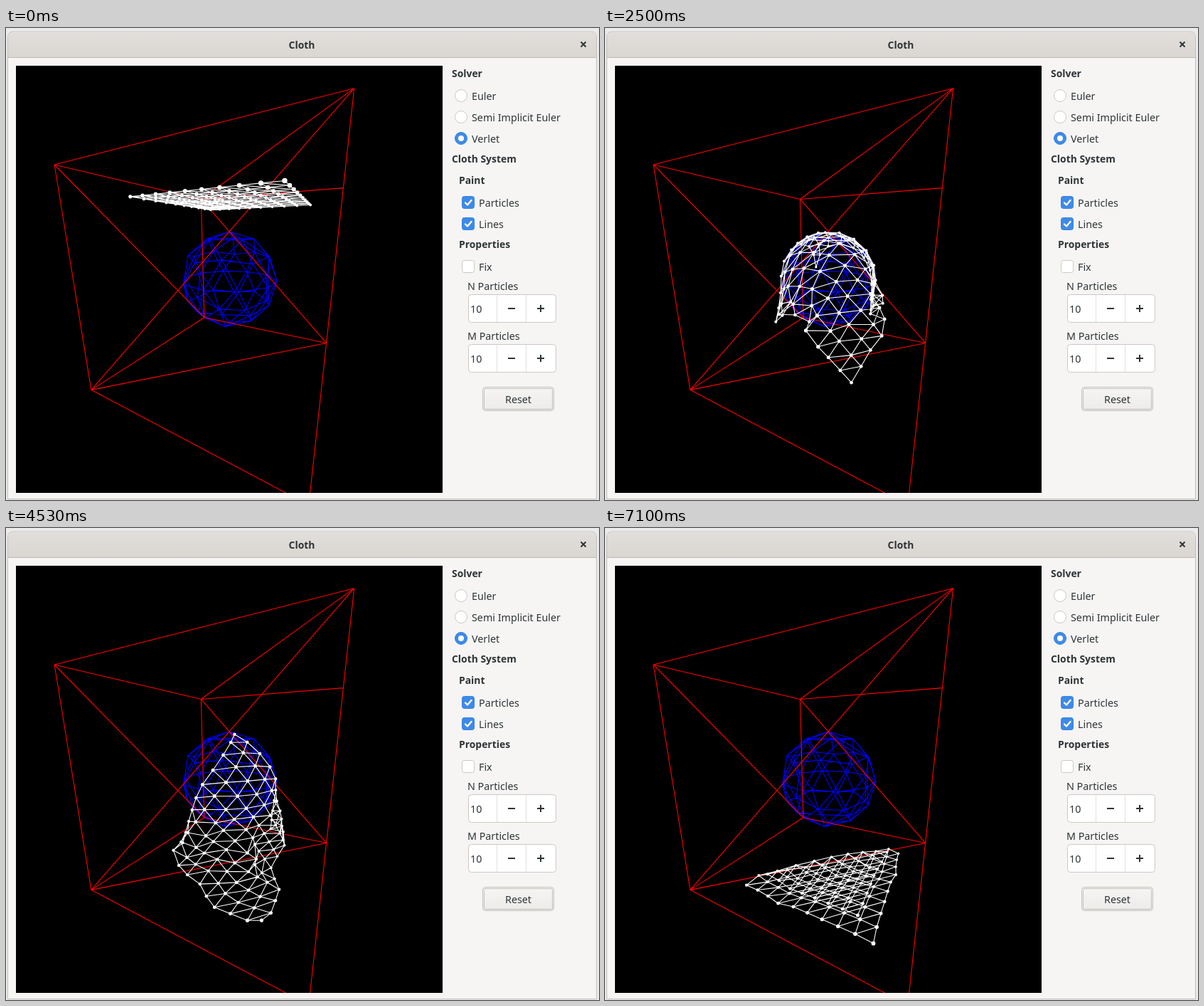
Animation of 834 by 663 pixels, one loop 7.13 s. Source, as an HTML page with a canvas:

```html
<!DOCTYPE html>
<html lang="en">
<head>
<meta charset="utf-8">
<title>Cloth</title>
<style>
html, body { margin: 0; width: 100%; height: 100%; overflow: hidden; background: #ebebeb; }
svg, canvas { position: absolute; left: 0; top: 0; }
canvas { left: 14px; top: 53px; }
text { font: 14.3px "Noto Sans", "Open Sans", sans-serif; fill: #2e3436; }
.b { font-weight: bold; font-size: 13.9px; }
.mid { text-anchor: middle; }
.box { fill: #fff; stroke: #cdc7c2; }
.on { fill: #3f8ae6; stroke: #3584e4; }
.mark { fill: none; stroke: #fff; stroke-width: 2.4; stroke-linecap: round; stroke-linejoin: round; }
.sign { fill: none; stroke: #2e3436; stroke-width: 2; }
</style>
</head>
<body>
<svg width="834" height="663" viewBox="0 0 834 663">
  <defs>
    <linearGradient id="bar" x2="0" y2="1"><stop stop-color="#e1dedb"/><stop offset="1" stop-color="#dad6d2"/></linearGradient>
    <linearGradient id="btn" x2="0" y2="1"><stop stop-color="#f6f5f4"/><stop offset="1" stop-color="#edebe9"/></linearGradient>
    <g id="check"><rect class="on" x=".5" y=".5" width="17" height="17" rx="3"/><path class="mark" d="M5 9.500l3 3 5.500-6.500"/></g>
    <g id="spin">
      <rect class="box" x=".5" y=".5" width="123" height="39" rx="4"/>
      <path d="M40.500 1v38M81.500 1v38" stroke="#e4e0dc"/>
      <path class="sign" d="M56 20h10M97 20h10M102 15v10"/>
      <text x="3" y="26">10</text>
    </g>
  </defs>
  <path d="M2.500 661.500V13q0-8 8-8h812q8 0 8 8v648.500z" fill="#f6f5f4" stroke="#c3beb9"/>
  <path d="M3 41V13q0-7.500 7.500-7.500h812q7.500 0 7.500 7.500v28z" fill="url(#bar)"/>
  <path d="M3 41.500h827" stroke="#bfb8b1"/>
  <path d="M808.500 19.500l7 7m0-7l-7 7" class="sign"/>
  <text class="b mid" x="416" y="29">Cloth</text>

  <text class="b" x="627" y="69">Solver</text>
  <circle class="box" cx="640" cy="95" r="8.500"/><text x="655" y="101">Euler</text>
  <circle class="box" cx="640" cy="125" r="8.500"/><text x="655" y="131">Semi Implicit Euler</text>
  <circle class="on" cx="640" cy="155" r="8.500"/><circle cx="640" cy="155" r="4" fill="#fff"/>
  <text x="655" y="161">Verlet</text>

  <text class="b" x="627" y="189">Cloth System</text>
  <text class="b" x="637" y="219">Paint</text>
  <use href="#check" x="641" y="236"/><text x="665" y="251">Particles</text>
  <use href="#check" x="641" y="266"/><text x="665" y="281">Lines</text>
  <text class="b" x="637" y="309">Properties</text>
  <rect class="box" x="641.500" y="326.500" width="17" height="17" rx="3"/><text x="665" y="341">Fix</text>
  <text x="649" y="368">N Particles</text><use href="#spin" x="650" y="374"/>
  <text x="649" y="438">M Particles</text><use href="#spin" x="650" y="444"/>

  <rect x="670.500" y="504.500" width="100" height="33" rx="4" fill="url(#btn)" stroke="#c4beb8"/>
  <rect x="672.500" y="506.500" width="96" height="29" rx="2" fill="none" stroke="#8b8e8f" stroke-dasharray="1 1"/>
  <text class="mid" x="720.500" y="527">Reset</text>
</svg>
<canvas id="view" width="600" height="600"></canvas>
<script>
const ctx = document.getElementById('view').getContext('2d');
const LOOP = 7130, FRAME = 100 / 3, FRAMES = 214;

// Camera at (1, .5, 2) looking at the origin with a 90 degree field of view.
const S5 = Math.sqrt(5), DIST = Math.sqrt(5.25), COS = S5 / DIST, SIN = 0.5 / DIST;
function project([x, y, z]) {
  const dx = x - 1, dy = y - 0.5, dz = z - 2;
  const forward = (-dx - 2 * dz) / S5, right = (2 * dx - dz) / S5;
  const depth = forward * COS - dy * SIN;
  return [300 + 300 * right / depth, 300 - 300 * (dy * COS + forward * SIN) / depth, depth];
}
const dist = (a, b) => Math.hypot(a[0] - b[0], a[1] - b[1], a[2] - b[2]);

// Box: twelve edges and one diagonal for each visible face.
const boxEdges = [];
for (const a of [-1, 1]) for (const b of [-1, 1]) {
  boxEdges.push([[a, b, -1], [a, b, 1]], [[a, -1, b], [a, 1, b]], [[-1, a, b], [1, a, b]]);
}
boxEdges.push(
  [[1, 1, 1], [-1, 1, -1]], [[1, 1, 1], [-1, -1, 1]], [[-1, 1, 1], [-1, -1, -1]],
  [[-1, 1, -1], [1, -1, -1]], [[-1, -1, 1], [1, -1, -1]]);

// Sphere: an icosahedron standing on a corner, subdivided once.
const R = 0.5;
const onSphere = v => v.map(c => c * R / Math.hypot(...v));
function pairs(points, reach) {
  const out = [];
  points.forEach((a, i) => points.slice(i + 1).forEach(b => dist(a, b) < reach && out.push([a, b])));
  return out;
}
const corners = [[0, R, 0], [0, -R, 0]];
for (let k = 0; k < 10; k++) {
  const angle = k * Math.PI / 5;
  corners.push(onSphere([2 * Math.cos(angle), k % 2 ? 1 : -1, 2 * Math.sin(angle)]));
}
const mids = pairs(corners, 0.6).map(([a, b]) => onSphere(a.map((c, k) => c + b[k])));
const sphereEdges = pairs([...corners, ...mids], 0.35);

// Cloth
const N = 10, GAP = 0.14, TOP = 0.78;
const id = (i, j) => i * N + j, place = i => (i - 4) * GAP;
const pos = [], old = [], links = [], bends = [];
for (let i = 0; i < N; i++) for (let j = 0; j < N; j++) {
  pos.push([place(i), TOP, place(j)]);
  old.push([place(i), TOP, place(j)]);
  if (i < N - 1) links.push([id(i, j), id(i + 1, j), GAP]);
  if (j < N - 1) links.push([id(i, j), id(i, j + 1), GAP]);
  if (i < N - 1 && j < N - 1) links.push([id(i + 1, j), id(i, j + 1), GAP * Math.SQRT2]);
  if (i < N - 2) bends.push([id(i, j), id(i + 2, j), 2 * GAP]);
  if (j < N - 2) bends.push([id(i, j), id(i, j + 2), 2 * GAP]);
}

// Guide poses: time, stretch, then near corner, centre and far corner (x = z, y),
// side corner and hem (x, y, z), both mirrored across x = z.
const near = place(9), far = place(0), hem = place(3);
const flat = (t, y) => [t, 1, near, y, 0, y, far, y, far, y, near, hem, y, near];
const poses = [
  flat(0, TOP),
  flat(0.7, TOP - 0.245),
  [1.7, 1.18, 0.516, -0.551, 0.05, 0.5, -0.354, -0.192, -0.47, -0.38, 0.42, -0.14, -0.17, 0.45],
  [3.27, 1.12, 0.441, -0.877, 0.325, 0.195, -0.24, 0.37, -0.45, -0.45, 0.34, -0.08, -0.3, 0.55],
  [4.53, 1.1, 0.588, -1, 0.34, -0.36, 0.107, 0.479, -0.36, -0.65, 0.38, -0.216, -0.9, 0.51],
  [5.27, 1, 0.7, -1, 0.38, -0.55, 0.352, 0.05, -0.3, -0.91, 0.375, -0.19, -1, 0.634],
  [6.43, 1, 0.73, -1, 0.1, -0.84, 0.47, -0.85, -0.54, -0.93, 0.43, -0.148, -1, 0.73],
  [7.1, 1, 0.736, -1, 0.08, -0.86, 0.552, -1, -0.57, -1, 0.71, -0.133, -1, 0.758]
];
function poseAt(t) {
  const last = poses.length - 1;
  let k = 0;
  while (k < last - 1 && t > poses[k + 1][0]) k++;
  const a = poses[k], b = poses[k + 1], span = b[0] - a[0];
  const s = Math.min(1, (t - a[0]) / span), s2 = s * s, s3 = s2 * s;
  const slope = (n, c) => {
    const p = poses[Math.max(0, n - 1)], q = poses[Math.min(last, n + 1)];
    return (q[c] - p[c]) / (q[0] - p[0]) * span;
  };
  return a.map((v, c) => v + (3 * s2 - 2 * s3) * (b[c] - v)
    + (s3 - 2 * s2 + s) * slope(k, c) + (s3 - s2) * slope(k + 1, c));
}
function guides(p) {
  return [
    [id(9, 9), [p[2], p[3], p[2]]], [id(4, 4), [p[4], p[5], p[4]]], [id(0, 0), [p[6], p[7], p[6]]],
    [id(0, 9), [p[8], p[9], p[10]]], [id(9, 0), [p[10], p[9], p[8]]],
    [id(3, 9), [p[11], p[12], p[13]]], [id(9, 3), [p[13], p[12], p[11]]]
  ];
}
// Links resist stretching far more than squeezing, so slack cloth sags.
function relax([ia, ib, rest], scale, pull, push) {
  const a = pos[ia], b = pos[ib], len = dist(a, b) || 1e-6, extra = len - rest * scale;
  const f = (extra > 0 ? pull : push) * extra / len / 2;
  for (let c = 0; c < 3; c++) {
    const d = (b[c] - a[c]) * f;
    a[c] += d;
    b[c] -= d;
  }
}
function collide(p) {
  const r = Math.hypot(...p);
  if (r < R) for (let c = 0; c < 3; c++) p[c] *= R / (r || 1);
  p[0] = Math.max(-1, Math.min(1, p[0]));
  p[1] = Math.max(-1, p[1]);
  p[2] = Math.max(-1, Math.min(1, p[2]));
}
function step(t, h) {
  pos.forEach((p, n) => {
    const drag = p[1] < -0.999 ? 0.9 : 0.995;
    for (let c = 0; c < 3; c++) {
      const v = (p[c] - old[n][c]) * (c === 1 ? 0.997 : drag);
      old[n][c] = p[c];
      p[c] += v - (c === 1 ? h * h : 0);
    }
  });
  const pose = poseAt(t), pins = guides(pose);
  const ramp = Math.max(0, Math.min(1, (t - 0.7) / 0.9)), pull = 0.25 * ramp * ramp;
  for (let n = 0; n < 12; n++) {
    for (const l of links) relax(l, pose[1], 0.4, 0.004);
    for (const l of bends) relax(l, pose[1], 0, 0.001);
    for (const [i, goal] of pins) goal.forEach((g, c) => { pos[i][c] += (g - pos[i][c]) * pull; });
    pos.forEach(collide);
  }
}

// The whole fall is worked out once, four steps to a picture.
const frames = [];
for (let k = 0; k < FRAMES; k++) {
  frames.push(pos.map(project));
  for (let n = 1; n <= 4; n++) step((k * 4 + n) / 120, 1 / 120);
}

function strokeLines(color, lines) {
  ctx.strokeStyle = color;
  ctx.beginPath();
  for (const [a, b] of lines) {
    ctx.moveTo(a[0], a[1]);
    ctx.lineTo(b[0], b[1]);
  }
  ctx.stroke();
}
const flatten = edges => edges.map(e => e.map(project));
const blue = flatten(sphereEdges), red = flatten(boxEdges);

function draw(now) {
  const k = Math.min(FRAMES - 1, Math.floor((now % LOOP + 4) / FRAME));
  const points = frames[k];
  ctx.fillStyle = '#000';
  ctx.fillRect(0, 0, 600, 600);
  ctx.lineWidth = 1.1;
  strokeLines('#00f', blue);
  strokeLines('#f00', red);
  strokeLines('#fff', links.map(([a, b]) => [points[a], points[b]]));
  ctx.fillStyle = '#fff';
  for (const [x, y, depth] of points) {
    ctx.beginPath();
    ctx.arc(x, y, 4.5 / depth, 0, 7);
    ctx.fill();
  }
}
const start = performance.now();
function tick() {
  draw(performance.now() - start);
  requestAnimationFrame(tick);
}
tick();
</script>
</body>
</html>
```
